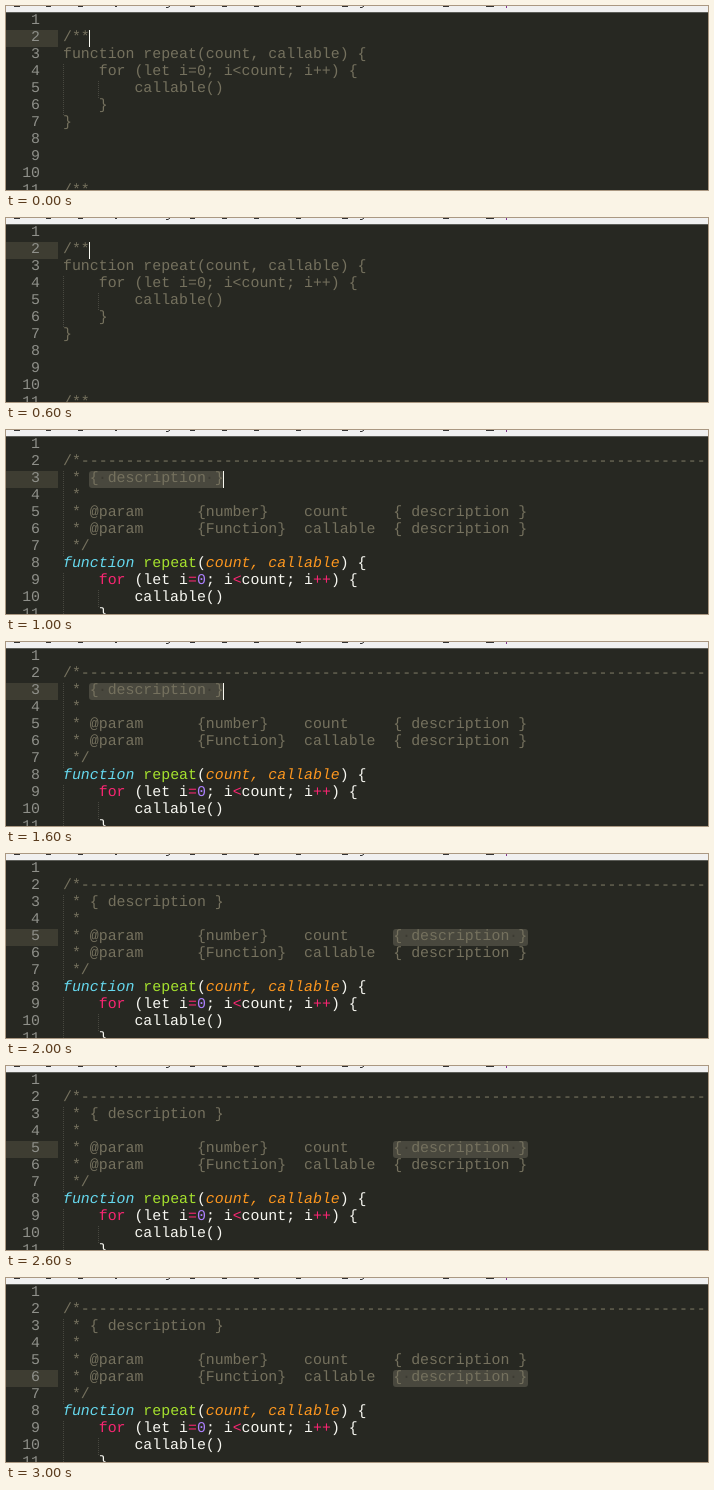
Recreate the animation shown at these times as an HTML page. Size 702 by 184 pixels, loop 4 s.

```html
<!DOCTYPE html>
<html lang="en">
<head>
<meta charset="utf-8">
<style>
html, body { margin: 0; width: 100%; height: 100%; overflow: hidden; background: #272822; }
#stage { position: relative; width: 702px; height: 184px; overflow: hidden; }
#stage > *, #guides i { position: absolute; }
pre { margin: 0; font: 14.88px/17px "Liberation Mono", monospace; text-rendering: geometricPrecision; color: #f8f8f2; }
#numbers { left: 0; top: 7px; width: 34px; text-align: right; color: #8f908a; }
#code { left: 57px; top: 7px; }
#bar { left: 0; top: 0; background: #f0f0f0; border-bottom: 1px solid #5c5d58; }
#row { left: 0; width: 52px; height: 17px; background: #3e3d32; }
#pick { height: 17px; width: 135px; border-radius: 3px; background: #49483e; color: #3b3a32; }
#caret { width: 1px; height: 17px; background: #f8f8f0; }
#guides i { width: 1px; background: repeating-linear-gradient(#484840 0 1px, transparent 1px 2px); }
.note { color: #75715e; }
.type { color: #66d9ef; font-style: italic; }
.name { color: #a6e22e; }
.arg { color: #fd971f; font-style: italic; }
.key { color: #f92672; }
.num { color: #ae81ff; }
</style>
</head>
<body>
<div id="stage">
  <svg id="bar" width="702" height="6">
    <path d="M8 .5h6M40 .5h5M72 .5h5M109 .5h2M184 .5h5M216 .5h5M248 .5h5M290 .5h5M336 .5h6M437 .5h6M480 .5h8" stroke="#333"/>
    <path d="M160 1.500h2l2-1.500M354 1.500h2l2-1.500" fill="none" stroke="#333"/>
    <path d="M500.500 0v2" stroke="#82358c"/>
  </svg>
  <div id="row"></div>
  <pre id="pick"> ·           ·</pre>
  <div id="guides"></div>
  <pre id="numbers"></pre>
  <pre id="code"></pre>
  <div id="caret"></div>
</div>
<script>
const $ = id => document.getElementById(id);
const span = (kind, text) => `<span class="${kind}">${text}</span>`;
const key = text => span('key', text);
const colX = col => 57 + col * 8.93;
const rowY = row => 7 + (row - 1) * 17;

const plain = '\n' + span('note', `/**
function repeat(count, callable) {
    for (let i=0; i&lt;count; i++) {
        callable()
    }
}



/**`);

const documented = '\n' + span('note', `/*${'-'.repeat(70)}
 * { description }
 *
 * @param      {number}    count     { description }
 * @param      {Function}  callable  { description }
 */`) + `
${span('type', 'function')} ${span('name', 'repeat')}(${span('arg', 'count, callable')}) {
    ${key('for')} (let i${key('=')}${span('num', 0)}; i${key('&lt;')}count; i${key('++')}) {
        callable()
    }`;

// Guides are [column, first row, last row].
const before = { code: plain, guides: [[0, 4, 6], [4, 5, 5]] };
const after = { code: documented, guides: [[0, 3, 7], [0, 9, 11], [4, 10, 10]] };
const steps = [
  { ...before, row: 2, caret: 3 },
  { ...after, row: 3, pick: 3, caret: 18 },
  { ...after, row: 5, pick: 37 },
  { ...after, row: 6, pick: 37 }
];

function place(id, col, row) {
  const { style } = $(id);
  style.display = col === undefined ? 'none' : 'block';
  style.left = Math.floor(colX(col ?? 0)) + 'px';
  style.top = rowY(row) + 'px';
}

function show({ code, guides, row, pick, caret }) {
  $('code').innerHTML = code;
  $('guides').innerHTML = guides.map(([col, from, to]) =>
    `<i style="left:${Math.floor(colX(col))}px;top:${rowY(from)}px;height:${(to - from + 1) * 17}px"></i>`).join('');
  $('row').style.top = rowY(row) + 'px';
  place('pick', pick, row);
  place('caret', caret, row);
}

$('numbers').textContent = Array.from({ length: 11 }, (_, i) => i + 1).join('\n');

let shown = -1;
const start = performance.now();
function tick() {
  const step = Math.floor((performance.now() - start) / 1000) % 4;
  if (step !== shown) show(steps[shown = step]);
  requestAnimationFrame(tick);
}
tick();
</script>
</body>
</html>
```
